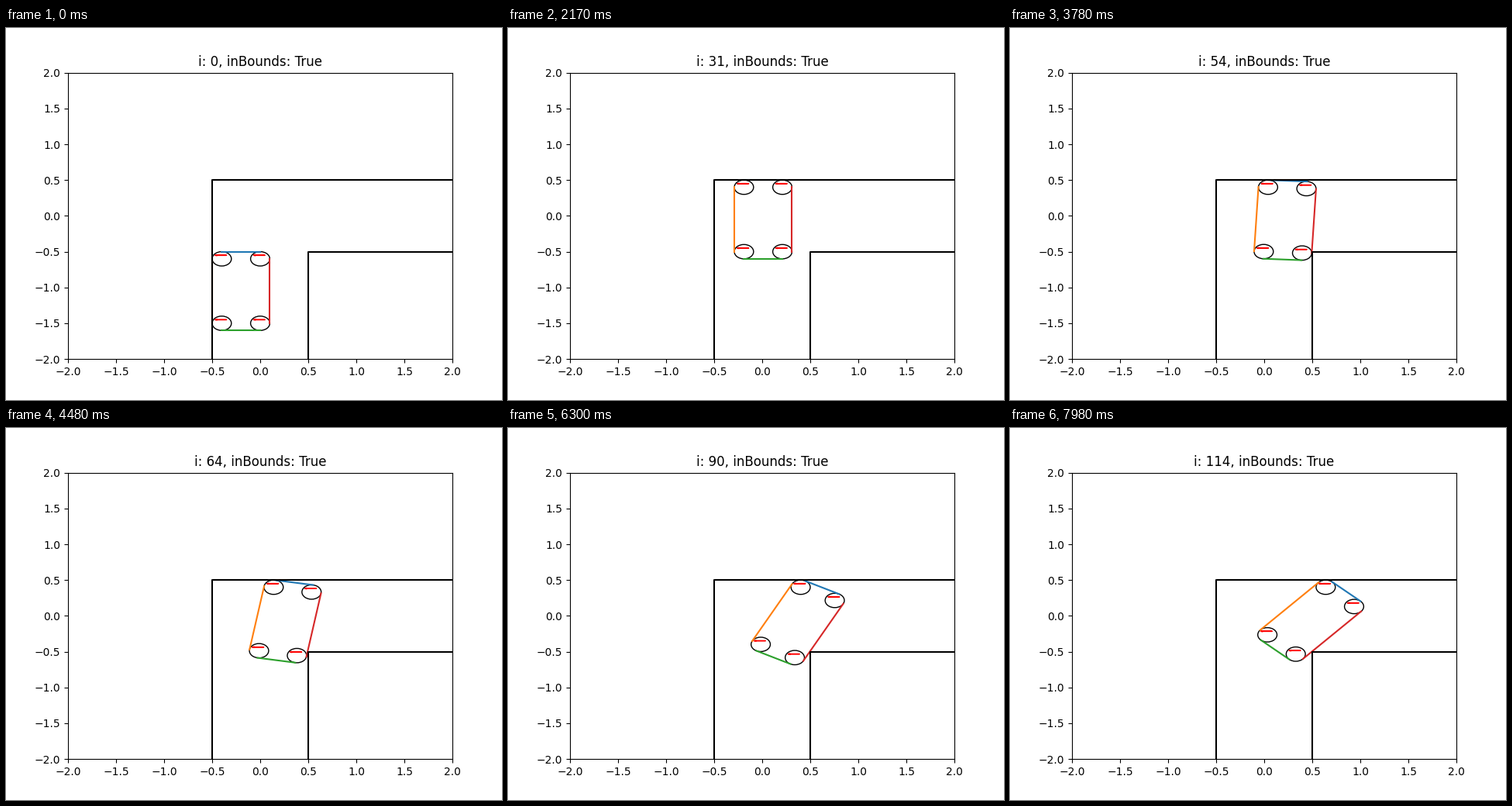
These frames come from a looping animation (640x480 px, 8 s). A matplotlib script:

```python
import math

import numpy as np
import matplotlib.pyplot as plt
from matplotlib.animation import FuncAnimation
from matplotlib.patches import Circle, FancyArrow

LOOP, TICK, STEP = 8000, 40, 70      # ms: loop, redraw interval, simulation step
WIDTH, LENGTH, R = 0.4, 0.9, 0.1     # wheel spacing and wheel radius
CORNER = np.array([0.5, -0.5])       # inner corner of the corridor
TURN = 0.01                          # smallest turn in radians


def turn_angle(front_left):
    """Smallest multiple of TURN that keeps the right side off the corner."""
    dx, dy = CORNER - front_left
    exact = math.asin((WIDTH + R) / math.hypot(dx, dy)) - math.atan2(dx, -dy)
    return max(0, math.ceil(exact / TURN - 1e-6)) * TURN


def pose(i):
    """Drive up to the wall, then slide right along it, turning when needed."""
    if i <= 10:
        return np.array([-0.4, -0.6 + 0.1 * i]), 0.0
    front_left = np.array([-0.4 + 0.01 * (i - 10), 0.4])
    return front_left, turn_angle(front_left)


fig, ax = plt.subplots(figsize=(6.4, 4.8), dpi=100)
ax.set_xlim(-2, 2)
ax.set_ylim(-2, 2)
title = ax.set_title("")

wheels = [ax.add_patch(Circle((0, 0), R, fill=False)) for _ in range(4)]
arrows = [ax.add_patch(FancyArrow(0, 0, -0.1, 0, width=0.005, color="red"))
          for _ in range(4)]
sides = [ax.plot([], [])[0] for _ in range(4)]

ax.plot([-0.5, -0.5, 2], [-2, 0.5, 0.5], color="black")
ax.plot([0.5, 0.5, 2], [-2, -0.5, -0.5], color="black")


def update(k):
    i = (k * TICK + TICK - 10) // STEP
    fl, a = pose(i)
    right = np.array([math.cos(a), -math.sin(a)])
    ahead = np.array([math.sin(a), math.cos(a)])
    fr = fl + WIDTH * right
    bl, br = fl - LENGTH * ahead, fr - LENGTH * ahead

    for (x, y), wheel, arrow in zip((fl, fr, bl, br), wheels, arrows):
        wheel.center = x, y
        arrow.set_data(x=x + 0.05, y=y + 0.05)

    edges = (fl, fr, ahead), (fl, bl, -right), (bl, br, -ahead), (fr, br, right)
    for line, (p, q, out) in zip(sides, edges):
        line.set_data(*np.transpose([p + R * out, q + R * out]))

    title.set_text(f"i: {i}, inBounds: True")
    return [*wheels, *arrows, *sides, title]


anim = FuncAnimation(fig, update, frames=LOOP // TICK, interval=TICK,
                     init_func=lambda: update(0), repeat=True, repeat_delay=0)
plt.show()
```
